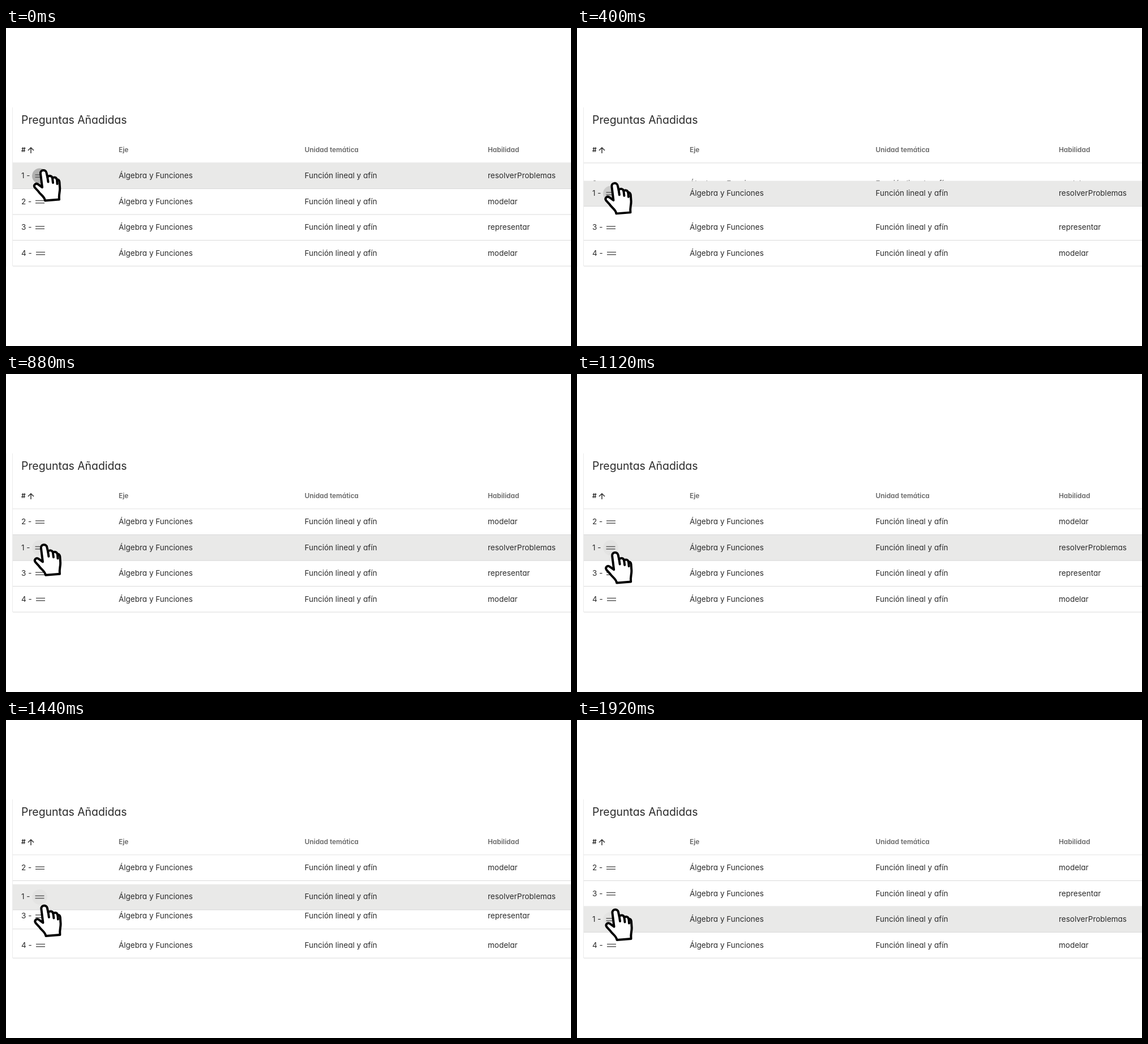
Animation, 998 px wide and 561 px high, one loop 5.02 s. Source, as an HTML page:

```html
<!DOCTYPE html>
<html lang="es">
<head>
<meta charset="utf-8">
<title>Preguntas Añadidas</title>
<style>
  html, body { margin: 0; width: 100%; height: 100%; overflow: hidden; background: #fff; }
  svg { display: block; width: 100%; height: 100%; }
  text { font: 13.5px Inter, sans-serif; font-feature-settings: "cv11"; fill: #2b2b2b; }
  .title { font-size: 19.4px; }
  .head { font-size: 11.9px; font-weight: 600; fill: #666; }
  .sort { fill: #222; }
  .arrow, .handle { fill: none; stroke: #333; stroke-width: 1.5; }
  .handle { stroke: #5c5c5c; }
  .rule { stroke: #dadada; }
  .hand { fill: #fff; stroke: #000; stroke-width: 4; stroke-linejoin: round; stroke-linecap: round; }
</style>
</head>
<body>
<svg viewBox="0 0 998 561">
  <path d="M.5 140V421" stroke="#f5f5f5"/>
  <path d="M11.5 140V420" stroke="#ebebeb"/>
  <text class="title" x="27" y="169">Preguntas Añadidas</text>
  <text class="head sort" x="27" y="218.5">#</text>
  <path class="arrow" d="M44 221V211M39 216L44 211L49 216"/>
  <text class="head" x="199" y="218.5">Eje</text>
  <text class="head" x="527.5" y="218.5">Unidad temática</text>
  <text class="head" x="851" y="218.5">Habilidad</text>
  <path class="rule" d="M12 238H998"/>
  <g id="rows"></g>
  <g id="hand" class="hand">
    <path d="M64 281L61 257C60 249.5 70.5 249 71.5 255.5L73.2 263C76 259.5 81 260.5 82 265C85 262 89 263.5 90 268C92 266.5 94 268.5 94.4 271.5L95.2 283C95.2 291 93 293 94 302.5L69 304.5C68 297 61 294.5 57 288L51 281.5C48 277.5 52.5 272.5 57 276Z"/>
    <path d="M73.2 263L74.5 271.5M82 265L83 273M90 268L90.5 275"/>
  </g>
</svg>
<script>
const LOOP = 5020, STEP = 40;
const TOP = 238, PITCH = 45.5;
const SWAP_TIME = 250, FIRST_SWAP = 300, SECOND_SWAP = 1410;
const skills = { 1: 'resolverProblemas', 2: 'modelar', 3: 'representar', 4: 'modelar' };

function rowMarkup(n) {
  const x = n === 4 ? 53 : n === 1 ? 51.5 : 52;
  const ripple = n === 1 ? '<circle id="ripple" cx="59.5" cy="23" r="13.5"/>' : '';
  return `<g id="row${n}">
    <rect x="12" y=".5" width="986" height="${PITCH}"/>
    <path class="rule" d="M12 ${PITCH}H998"/>${ripple}
    <text x="27" y="27">${n} -</text>
    <path class="handle" d="M${x} 20.9h16m0 4.4h-16"/>
    <text x="199" y="27">Álgebra y Funciones</text>
    <text x="527.5" y="27">Función lineal y afín</text>
    <text x="851" y="27">${skills[n]}</text>
  </g>`;
}

const byId = id => document.getElementById(id);
// The dragged row comes last so that it slides above the others.
byId('rows').innerHTML = [4, 3, 2, 1].map(rowMarkup).join('');

const clamp = v => Math.min(1, Math.max(0, v));
const bezier = (a, b, s) => 3 * a * s * (1 - s) ** 2 + 3 * b * s * s * (1 - s) + s ** 3;

// CSS "ease" timing curve
function ease(u) {
  let lo = 0, hi = 1;
  for (let i = 0; i < 20; i++) {
    const mid = (lo + hi) / 2;
    if (bezier(.25, .25, mid) < u) lo = mid; else hi = mid;
  }
  return bezier(.1, 1, lo);
}

const swap = (t, start) => {
  const u = clamp((t - start) / SWAP_TIME);
  return u === 0 || u === 1 ? u : ease(u);
};

function hoveredRow(t) {
  if (t >= 250 && t < FIRST_SWAP) return 2;
  if (t >= 1385 && t < SECOND_SWAP) return 3;
  return 1;
}

// Steady drag, then a braking stop
function handOffset(t) {
  const brake = clamp((t - 1120) / 800);
  return .0572 * Math.min(t, 1120) + 19.5 * (1 - (1 - brake) ** 2);
}

function draw(t) {
  const first = swap(t, FIRST_SWAP), second = swap(t, SECOND_SWAP);
  const slots = { 1: first + second, 2: 1 - first, 3: 2 - second, 4: 3 };
  const hovered = hoveredRow(t);
  for (const n in slots) {
    const row = byId('row' + n);
    row.setAttribute('transform', `translate(0 ${TOP + PITCH * slots[n]})`);
    row.querySelector('rect').setAttribute('fill', +n === hovered ? '#e9e9e8' : '#fff');
  }
  byId('ripple').setAttribute('fill-opacity', Math.max(.025, .24 - t * .0003));
  const dy = handOffset(t);
  byId('hand').setAttribute('transform', `translate(${dy * .018} ${dy})`);
}

const begin = performance.now();
function tick() {
  const t = (performance.now() - begin) % LOOP;
  draw(Math.floor(t / STEP) * STEP);
  requestAnimationFrame(tick);
}
tick();
</script>
</body>
</html>
```
